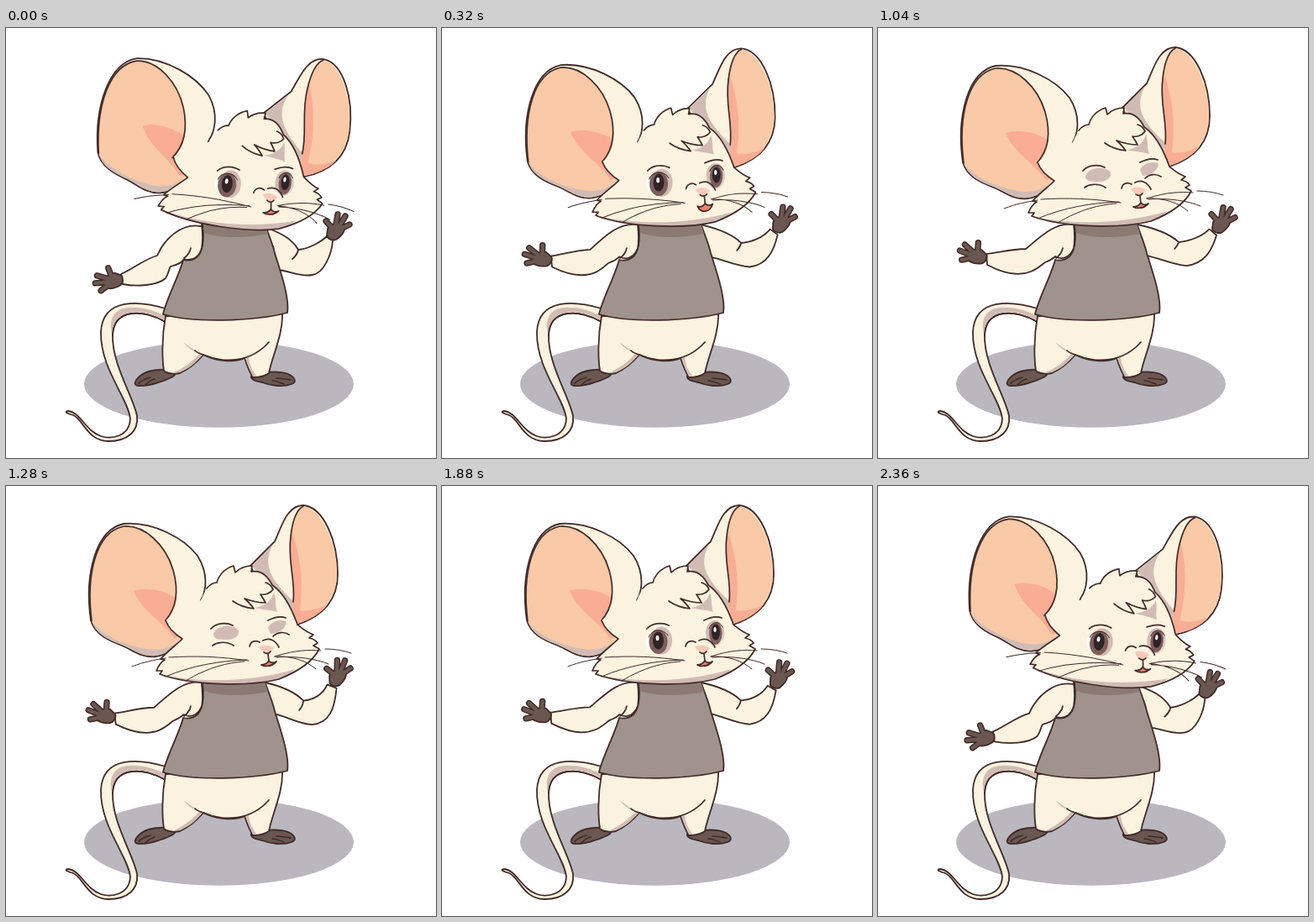
An HTML page for the animation above (2400 ms loop, 512x512 px).

```html
<!DOCTYPE html>
<html lang="en">
<head>
<meta charset="utf-8">
<title>Waving mouse</title>
<style>
  html, body { margin: 0; width: 100%; height: 100%; overflow: hidden; background: #fff; }
  svg { display: block; width: 100vw; height: 100vh; }
  path, ellipse { stroke-linecap: round; stroke-linejoin: round; }
  .fur { fill: #fbf2e0; }
  .ink { stroke: #402b29; stroke-width: 1.8; }
  .line { fill: none; stroke: #402b29; stroke-width: 1.7; }
  .hair { fill: none; stroke: #402b29; stroke-width: 1; }
  .shade { fill: #d1bcb5; }
  .skin { fill: #fac9a7; }
  .pink { fill: #f8ad94; }
  .paw { fill: #6b5751; }
</style>
</head>
<body>
<svg viewBox="0 0 512 512">
  <defs>
    <path id="fingers" d="M-4 5L-14 -6M-3 3L0 -14M0 3L9 -12M0 5L14 -2"/>
    <g id="hand" fill="none">
      <use href="#fingers" stroke="#402b29" stroke-width="7.4"/>
      <path class="paw ink" d="M-12 3C-8 -4 5 -5 8 1C9 7 3 13 -2 16C-7 18 -13 14 -13 11Z"/>
      <use href="#fingers" stroke="#6b5751" stroke-width="4.4"/>
    </g>
  </defs>

  <ellipse cx="253.5" cy="424" rx="160.5" ry="51.8" fill="#bab7bf"/>

  <!-- tail, legs and feet -->
  <path class="fur ink" d="M190 334C160 325 115 320 113 362C112 405 145 440 148 465C147 487 125 490 113 486C95 480 88 457 74 456C67 457 76 460 80 461C92 466 97 492 122 492C145 492 158 480 156 462C152 440 126 400 127 366C128 333 165 335 190 350Z"/>
  <path class="shade" d="M189 348C165 334 129 332 126 364C122 348 128 334 146 333C163 332 178 337 189 343Z"/>
  <path class="line" d="M190 350C165 335 128 333 127 366"/>
  <path class="paw ink" d="M196 407C185 406 168 407 160 414C153 420 151 426 158 426C170 427 178 423 185 421C195 417 202 415 202 410Z"/>
  <path class="paw ink" d="M292 414C305 409 325 408 336 412C345 416 346 422 340 424C330 428 315 426 305 422C295 420 291 418 292 414Z"/>
  <path class="line" d="M158 423C163 419 167 417 172 416M166 425C170 421 173 419 177 418M339 419C333 418 328 417 322 417M331 424C326 422 321 420 317 420"/>
  <path class="fur ink" d="M190 343C185 370 186 395 188 408C192 412 202 412 207 411C220 405 230 395 235 389C252 398 275 398 284 393C287 402 290 410 294 416C301 416 309 414 313 411C317 390 330 365 329 340Z"/>
  <path class="shade" d="M200 410C213 404 223 396 230 388L234 389C226 399 216 407 206 410ZM285 393L289 392C290 401 293 408 298 414L294 415ZM211 374C217 381 222 385 228 386Z"/>
  <path class="line" d="M225 384C228 387 231 388 235 389C260 400 292 398 313 374"/>

  <path id="armR" class="fur ink"/>
  <path class="ink" fill="#a0928c" d="M234 232C236 250 235 265 228 272C222 277 215 277 211 276C206 295 190 325 187 341C223 351 292 350 335 339C338 320 325 285 320 268C317 255 312 245 308 232Z"/>
  <path fill="#8b7a74" d="M235 233L236 244C252 250 285 251 312 245L308 233Z"/>
  <path id="armL" class="fur ink"/>
  <path class="line" d="M220 262C219 267 216 271 212 274"/>

  <g id="head">
    <g id="earL">
      <path class="fur ink" d="M232 136C238 126 242 105 228 83C212 62 175 42 140 45C107 52 93 105 101 160C106 177 122 184 138 190C152 196 162 205 178 203C192 201 203 193 210 183L225 165Z"/>
      <path class="shade" d="M102 160C106 176 122 183 138 189C152 195 162 204 178 202C190 200 198 195 205 187L180 165Z"/>
      <path class="skin" d="M140 48C165 46 190 70 199 100C206 125 203 145 190 160L209 180C204 189 190 195 175 195C150 193 115 180 102 161C95 105 107 55 140 48Z"/>
      <path class="pink" d="M152 125C163 120 188 123 203 134C201 148 196 155 190 160L205 178C203 182 201 182 199 180C188 162 163 151 152 125Z"/>
      <path class="line" d="M102 161C95 105 107 55 140 48C165 46 190 70 199 100C206 125 203 145 190 160"/>
    </g>
    <g>
      <path class="fur ink" d="M291 95L320 66C325 55 330 40 336 33C342 25 348 23 354 23C378 25 395 65 395 105C395 136 377 155 347 165L310 135Z"/>
      <path class="shade" d="M293 95L318 69C306 92 312 109 342 137L345 155L318 125Z"/>
      <path class="skin" d="M354 24C378 28 394 72 394 105C393 138 371 157 346 164C339 155 342 148 342 138C345 112 335 90 339 60C341 42 346 28 354 24Z"/>
      <path class="pink" d="M340 54C336 85 345 112 342 138C342 150 342 158 346 164C362 160 376 151 383 141C373 146 360 150 350 148C355 110 349 78 340 54Z"/>
      <path class="line" d="M354 24C346 28 341 42 339 60C335 90 345 112 342 138"/>
    </g>

    <path class="fur" d="M232 136C236 128 237 125 239 122C243 117 246 115 251 115C253 106 261 98 271 95L273 103C279 97 286 95 293 95L292 102C303 100 311 106 317 118C332 128 341 148 347 165C352 169 357 174 366 177L361 181C366 182 369 184 371 187L366 190L373 194C366 208 350 220 325 230C290 239 222 238 183 224L186 220L179 220C182 213 185 209 189 207L184 206C192 197 203 189 210 182C202 177 194 171 190 160C205 150 220 143 232 136Z"/>
    <path class="shade" d="M183 224C230 235 290 234 345 218C338 224 331 228 325 230C290 239 222 238 183 224ZM296 145C306 144 316 138 319 127C322 135 320 143 323 150C313 147 304 147 296 145Z"/>
    <path class="line" d="M239 122C243 117 246 115 251 115C253 106 261 98 271 95L273 103C279 97 286 95 293 95L292 102C303 100 311 106 317 118C332 128 341 148 347 165C352 169 357 174 366 177L361 181C366 182 369 184 371 187L366 190L373 194C366 208 350 220 325 230C290 239 222 238 183 224L186 220L179 220C182 213 185 209 189 207L184 206C192 197 203 189 210 182C202 177 194 171 190 160"/>
    <path class="line" d="M270 137C277 142 286 145 295 146C292 142 289 138 284 134C292 137 300 139 309 139C307 135 305 132 303 129C308 130 315 128 318 123C316 119 313 116 309 115"/>

    <g id="lids">
      <path class="shade" d="M247 176C251 165 271 164 277 172C278 179 272 183 262 183C252 183 247 182 247 176ZM312 169C316 160 329 158 334 162C332 171 326 175 315 176Z"/>
      <path class="line" d="M246 190C252 185 264 185 271 190M318 179C323 174 331 173 337 177"/>
    </g>
    <g class="eye">
      <ellipse class="shade" cx="261" cy="184" rx="13" ry="16.5"/>
      <ellipse cx="251" cy="185" rx="8.5" ry="12" fill="#fffdfa"/>
      <ellipse cx="257.5" cy="185.5" rx="11" ry="14.5" fill="#7d5e5a"/>
      <ellipse cx="257.5" cy="184" rx="6.5" ry="10.5" fill="#302327"/>
      <ellipse cx="256.5" cy="181" rx="1.9" ry="3.2" fill="#fff"/>
      <path class="hair" d="M246 180C250 170 263 169 269 178"/>
    </g>
    <g class="eye">
      <ellipse class="shade" cx="325" cy="175" rx="11" ry="15"/>
      <ellipse cx="328" cy="176" rx="6.5" ry="12" fill="#fffdfa"/>
      <ellipse cx="326" cy="175.5" rx="7.8" ry="13.2" fill="#7d5e5a"/>
      <ellipse cx="326" cy="174" rx="5" ry="9.5" fill="#302327"/>
      <ellipse cx="325" cy="171" rx="1.6" ry="3" fill="#fff"/>
      <path class="hair" d="M318 170C321 161 330 160 334 168"/>
    </g>
    <path class="line" d="M244 170C250 163 262 162 270 166M312 160C320 156 328 155 333 157"/>

    <path fill="#f4cbbb" d="M301 192C306 188 314 189 319 193C316 197 313 200 310 200C307 198 303 195 301 192Z"/>
    <path class="line" d="M290 191C291 185 297 183 302 186M306 184C314 180 321 184 325 192M307 198C309 200 313 200 315 197M312 200L313 208"/>
    <path id="mouth" class="ink" fill="#f0836f"/>
    <path class="hair" d="M150 215C165 209 178 207 190 205M194 204C225 202 255 203 289 208M190 227C220 214 255 208 287 207M214 232C240 216 265 210 284 209M320 203C345 195 360 195 375 196M380 194C392 194 402 196 411 199M320 203C340 202 358 208 369 218M322 204C345 202 370 206 384 212"/>
  </g>

  <use id="handL" href="#hand"/>
  <use id="handR" href="#hand"/>
</svg>

<script>
const $ = id => document.getElementById(id);
const LOOP = 2400;

// Blend two strings of the same form number by number.
const mix = (a, b, t) => {
  const ends = b.match(/-?[\d.]+/g);
  let i = 0;
  return a.replace(/-?[\d.]+/g, v => (+v + (ends[i++] - v) * t).toFixed(2));
};

const armL = {
  rest: 'M232 236C208 232 188 252 180 271C165 275 153 286 137 293L139 305C155 308 180 307 190 298C194 292 194 286 196 284C204 282 210 279 212 275C224 279 231 270 233 262C235 250 234 242 233 234',
  up: 'M232 234C210 231 192 250 176 263C160 263 145 267 129 269L130 282C145 290 165 297 182 290C190 287 197 280 199 279C204 277 208 275 211 272C222 278 230 270 233 262C235 250 234 242 233 234'
};
const armR = {
  rest: 'M311 238C326 244 340 250 348 264C360 263 375 255 382 248L389 253C388 270 378 292 365 294C350 297 335 288 323 288L318 260M348 264C347 270 344 272 341 275',
  out: 'M309 234C328 238 346 243 359 255C372 253 386 250 397 240L405 248C398 268 388 280 368 283C350 281 335 274 320 271L315 255M359 255C357 259 355 261 354 262',
  in: 'M309 234C325 238 342 246 351 256C362 256 372 247 373 234L386 236C387 262 384 284 362 285C345 284 335 275 321 272L315 255M351 256C351 262 348 268 346 270'
};
const handL = {
  rest: 'translate(121 301)rotate(-64)scale(-1 1)',
  up: 'translate(112 269)rotate(-38)scale(-1 1)'
};
const handR = {
  rest: 'translate(395 236)rotate(0)',
  out: 'translate(414 229)rotate(2)',
  in: 'translate(385 216)rotate(-16)'
};
const mouth = {
  shut: 'M304 213C307 213 311 211 313 208C315 211 319 211 322 209C319 212 316 214 313 214C309 215 306 214 304 213Z',
  open: 'M304 210C308 213 311 211 313 208C315 211 319 211 322 208C323 215 319 222 313 222C309 222 305 216 304 210Z'
};

function draw(t) {
  const ease = (from, to) => {
    const x = Math.min(1, Math.max(0, (t - from) / (to - from)));
    return x * x * (3 - 2 * x);
  };
  const lift = ease(0, 400) - ease(2000, 2400);
  const wave = .78 + .4 * ease(400, 780) - 1.18 * ease(780, 1600) + .78 * ease(1600, 2000);
  const open = 1 - ease(640, 880) + ease(1600, 1840);
  const talk = ease(160, 520) - ease(600, 840);
  const dip = 5 * lift * (1 - wave) ** 2;
  const raised = pose => mix(pose.rest, mix(pose.in, pose.out, wave), lift);

  $('armR').setAttribute('d', raised(armR));
  $('handR').setAttribute('transform', raised(handR));

  $('armL').setAttribute('d', mix(armL.rest, armL.up, lift));
  $('armL').setAttribute('transform', `rotate(${-dip * .6} 215 250)`);
  $('handL').setAttribute('transform', `translate(${dip * .4} ${dip})` + mix(handL.rest, handL.up, lift));

  $('head').setAttribute('transform', `rotate(${6.8 * (1 - lift)} 248 234)`);
  $('earL').setAttribute('transform', `rotate(${-2.8 * (1 - lift)} 205 180)`);
  $('mouth').setAttribute('d', mix(mouth.shut, mouth.open, talk));

  const closed = open < .15;
  $('lids').style.display = closed ? '' : 'none';
  document.querySelectorAll('.eye').forEach((eye, i) => {
    const y = i ? 177 : 188;
    eye.style.display = closed ? 'none' : '';
    eye.setAttribute('transform', `translate(0 ${y})scale(1 ${open})translate(0 ${-y})`);
  });
}

function tick() {
  draw(performance.now() % LOOP);
  requestAnimationFrame(tick);
}
tick();
</script>
</body>
</html>
```
